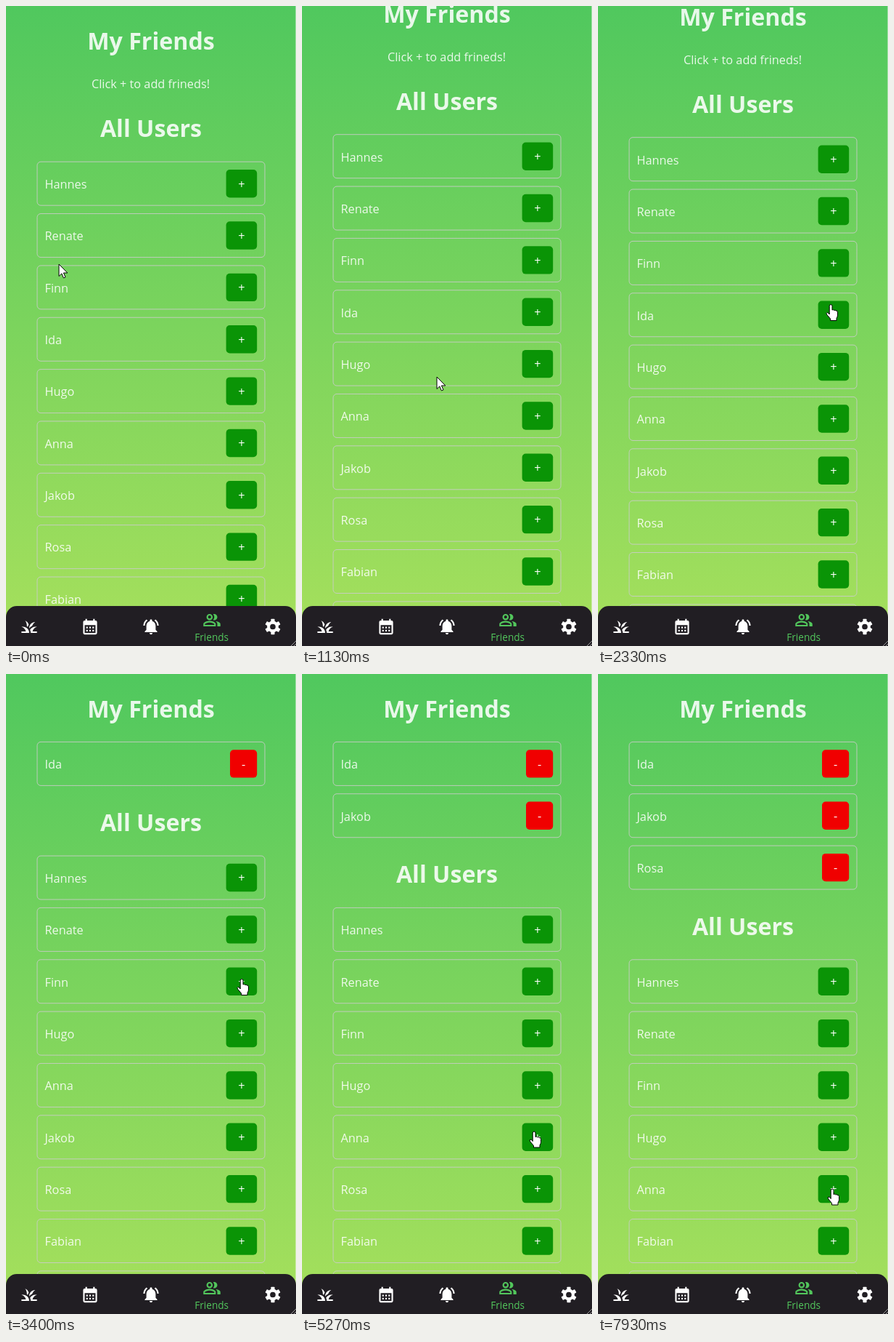
An HTML page for the animation above (8000 ms loop, 400 by 880 pixels).

```html
<!DOCTYPE html>
<html lang="en">
<head>
<meta charset="utf-8">
<title>Friends list</title>
<style>
  html, body { margin: 0; width: 100%; height: 100%; overflow: hidden; }
  svg { display: block; }
  #stage { width: 100vw; height: 100vh; }
  text { font: 16.3px "Open Sans", "Noto Sans", sans-serif; fill: rgba(255, 255, 255, .87); }
  .mid { text-anchor: middle; }
  .title { font-size: 32.2px; font-weight: 700; }
  .sign { fill: #fff; }
  .box { fill: none; stroke: #ccc; stroke-opacity: .85; }
  .add { fill: #0a9406; }
  .remove { fill: #f00000; }
  .tab { font-size: 13.6px; fill: #52c65c; }
  .cursor { fill: #fff; stroke: #000; stroke-linejoin: round; }
</style>
</head>
<body>
<svg id="stage" viewBox="0 0 400 880">
  <defs>
    <linearGradient id="sky" x2="0" y2="1">
      <stop stop-color="#50c85e"/>
      <stop offset="1" stop-color="#a7e05c"/>
    </linearGradient>
    <rect id="tooth" x="-2.4" y="-10" width="4.8" height="4" rx=".6"/>
  </defs>
  <rect width="400" height="880" fill="url(#sky)"/>
  <g id="page"></g>

  <rect y="825" width="400" height="80" rx="15" fill="#211e23"/>
  <g id="tabs" fill="#fff"></g>
  <text class="mid tab" x="283.7" y="873">Friends</text>
  <path d="M393 880l7-7M397 880l3-3" stroke="#999" fill="none"/>

  <path id="arrow" class="cursor" d="M0 0V16.5l3.8-3.6 2.6 6 2.6-1.1-2.6-5.8h5.4z"/>
  <path id="hand" class="cursor" d="M-1.8 13.5V2a1.9 1.9 0 0 1 3.8 0v5.5q1.6-1 2.6.4 1.8-.7 2.5.6 2.4-.5 2.4 2v4q0 2-1.5 4.5v3h-8.5v-2.5L-5.2 14q-1.6-2.4.2-3 1.4-.3 3.2 2.5z"/>
</svg>

<script>
const LOOP = 8000, PITCH = 71.35;
const people = ['Hannes', 'Renate', 'Finn', 'Ida', 'Hugo', 'Anna', 'Jakob', 'Rosa', 'Fabian', 'Oskar'];
const clicks = [[2750, 'Ida'], [4800, 'Jakob'], [7400, 'Rosa']];

// Keyframes: time, then values
const scrollTrack = [[0, 0], [350, 0], [850, 37.5], [1800, 37.5], [2100, 33.5], [2850, 33.5], [3150, 0]];
const cursorTrack = [
  [0, 73, 355], [250, 73, 355], [1000, 186, 510], [1350, 186, 510], [2150, 321, 410.5],
  [2900, 321, 410.5], [3250, 325, 419.5], [3550, 325, 419.5], [4400, 320, 629],
  [5500, 320, 629], [6300, 303, 719.5], [6550, 303, 719.5], [7050, 323, 708]
];

const icons = {
  grass: 'M12 20H2v-2h5.75A8.03 8.03 0 0 0 2 12.26c.64-.16 1.31-.26 2-.26 4.42 0 8 3.58 8 8zm10-7.74c-.64-.16-1.31-.26-2-.26-2.93 0-5.48 1.58-6.88 3.93a9.82 9.82 0 0 1 .87 4.07h8v-2h-5.75A8.07 8.07 0 0 1 22 12.26zm-6.36-1.24a10 10 0 0 1 4.09-5C15.44 6.16 12 9.67 12 14v.02c.95-1.27 2.2-2.3 3.64-3zm-4.22-2.17A8.5 8.5 0 0 0 6.7 4C8.14 5.86 9 8.18 9 10.71l-.04.61c.43.24.83.52 1.22.82a9.9 9.9 0 0 1 1.24-3.29z',
  calendar: 'M19 4h-1V2h-2v2H8V2H6v2H5a2 2 0 0 0-2 2v14a2 2 0 0 0 2 2h14a2 2 0 0 0 2-2V6a2 2 0 0 0-2-2zm0 16H5V10h14zM7 12h2v2H7zm4 0h2v2h-2zm4 0h2v2h-2zm-8 4h2v2H7zm4 0h2v2h-2zm4 0h2v2h-2z',
  bell: 'M7.58 4.08L6.15 2.65A10.5 10.5 0 0 0 2.03 10.5h2a8.45 8.45 0 0 1 3.55-6.42zm12.39 6.42h2a10.5 10.5 0 0 0-4.12-7.85l-1.42 1.43a8.5 8.5 0 0 1 3.54 6.42zM18 11c0-3.07-1.64-5.64-4.5-6.32V4a1.5 1.5 0 0 0-3 0v.68C7.63 5.36 6 7.92 6 11v5l-2 2v1h16v-1l-2-2zm-6 11a2 2 0 0 0 2-2h-4a2 2 0 0 0 2 2z',
  people: 'M16.67 13.13C18.04 14.06 19 15.32 19 17v3h4v-3c0-2.18-3.57-3.47-6.33-3.87zM15 12a4 4 0 0 0 0-8c-.47 0-.91.1-1.33.24a6 6 0 0 1 0 7.52c.42.14.86.24 1.33.24zM9 12a4 4 0 0 0 0-8 4 4 0 0 0 0 8zm0-6a2 2 0 0 1 0 4 2 2 0 0 1 0-4zm0 7c-2.67 0-8 1.34-8 4v3h16v-3c0-2.66-5.33-4-8-4zm6 5H3v-1c.2-.7 3.3-2 6-2s5.8 1.3 6 2z'
};

const $ = id => document.getElementById(id);

const drawTabs = () => {
  const icon = (name, x, y = 853.5, fill = '#fff') =>
    `<path transform="translate(${x} ${y}) scale(1.067) translate(-12 -12)" fill="${fill}" fill-rule="evenodd" d="${icons[name]}"/>`;
  const teeth = [0, 60, 120, 180, 240, 300].map(a => `<use href="#tooth" transform="rotate(${a})"/>`).join('');
  $('tabs').innerHTML = icon('grass', 32) + icon('calendar', 116) + icon('bell', 200) +
    icon('people', 284, 844.5, '#52c65c') +
    `<g transform="translate(368 853.5) scale(1.067)">${teeth}<circle r="5.5" fill="none" stroke="#fff" stroke-width="3.8"/></g>`;
};

const label = (string, x, y, cls) => `<text class="${cls}" x="${x}" y="${y}">${string}</text>`;

const row = (name, top, isFriend) => {
  const [left, width, cls, sign] = isFriend ? [309, 37.2, 'remove', '-'] : [303.6, 42.6, 'add', '+'];
  return `<rect class="box" x="43" y="${top + .4}" width="314" height="60" rx="5"/>` +
    label(name, 53.5, top + 37.2, '') +
    `<rect class="${cls}" x="${left}" y="${top + 11.2}" width="${width}" height="38.4" rx="5"/>` +
    label(sign, left + width / 2, top + 36.7, 'mid sign');
};

function layout(count) {
  const friends = clicks.slice(0, count).map(click => click[1]);
  const others = people.filter(name => !friends.includes(name));
  const usersTop = count ? 178.3 + count * PITCH : 213.8;
  return { friends, others, usersTop };
}

function drawPage({ friends, others, usersTop }) {
  $('page').innerHTML =
    label('My Friends', 200, 60, 'mid title') +
    (friends.length ? '' : label('Click + to add frineds!', 199.5, 113, 'mid')) +
    friends.map((name, i) => row(name, 93 + i * PITCH, true)).join('') +
    label('All Users', 200, usersTop - 33.6, 'mid title') +
    others.map((name, i) => row(name, usersTop + i * PITCH, false)).join('') +
    '<path d="M399.5 0V900" stroke="#fff" stroke-opacity=".4"/>';
}

function sample(track, t) {
  const next = track.findIndex(key => key[0] > t);
  if (next < 0) return track[track.length - 1].slice(1);
  const [t0, ...from] = track[next - 1], [t1, ...to] = track[next];
  const p = (t - t0) / (t1 - t0), eased = p * p * (3 - 2 * p);
  return from.map((v, i) => v + (to[i] - v) * eased);
}

function overButton(x, y, usersTop) {
  const inRow = (y - usersTop) % PITCH;
  return x > 303.6 && x < 346.2 && y > usersTop && inRow > 11.2 && inRow < 49.6;
}

let shownCount = -1, current;

function render(now) {
  const t = now % LOOP;
  const count = clicks.filter(click => click[0] <= t).length;
  if (count !== shownCount) {
    shownCount = count;
    current = layout(count);
    drawPage(current);
  }
  const [scroll] = sample(scrollTrack, t);
  const [x, y] = sample(cursorTrack, t);
  $('page').setAttribute('transform', `translate(0 ${-scroll})`);
  const pointing = overButton(x, y + scroll, current.usersTop);
  for (const [id, visible] of [['hand', pointing], ['arrow', !pointing]]) {
    $(id).setAttribute('transform', `translate(${x} ${y})`);
    $(id).style.display = visible ? '' : 'none';
  }
}

function tick() {
  render(performance.now());
  requestAnimationFrame(tick);
}

drawTabs();
tick();
</script>
</body>
</html>
```
